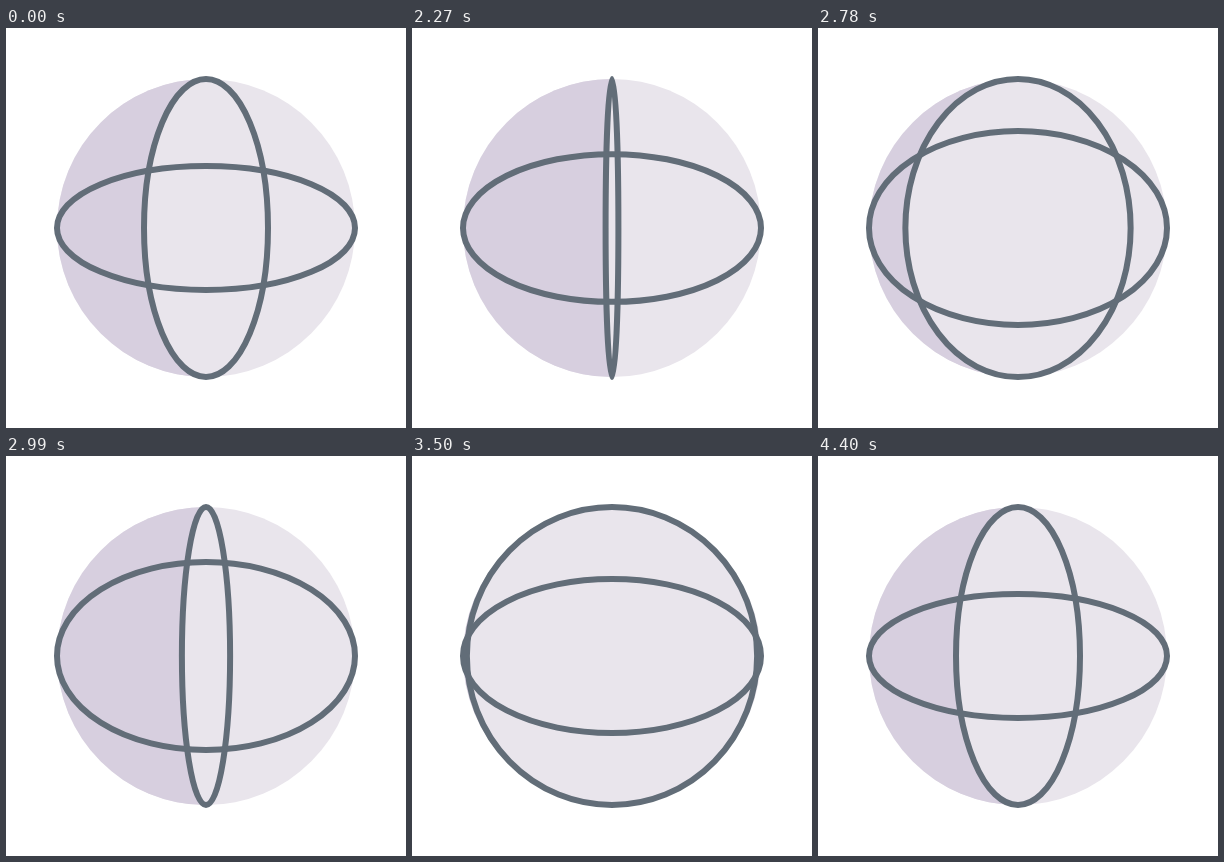
Recreate the animation shown at these times as an HTML page. Size 400 px wide and 400 px high, loop 4430 ms.

```html
<!DOCTYPE html>
<html lang="en">
<head>
<meta charset="utf-8">
<title>Turning globe</title>
<style>
  html, body { margin: 0; width: 100%; height: 100%; overflow: hidden; background: #fff; }
  svg { display: block; width: 100vw; height: 100vh; }
  .light { fill: #e9e5ec; }
  .dark { fill: #d7cfdf; }
  .ring { fill: none; stroke: #626d78; stroke-width: 6; }
</style>
</head>
<body>
<svg viewBox="0 0 400 400">
  <circle class="light" cx="200" cy="200" r="149"/>
  <path class="dark" d="M200 51A149 149 0 0 0 200 349Z"/>
  <ellipse class="light meridian" cx="200" cy="200" ry="149"/>
  <ellipse class="ring meridian" cx="200" cy="200" ry="149"/>
  <ellipse class="ring" id="equator" cx="200" cy="200" rx="149"/>
</svg>
<script>
  const LOOP = 4430, HOLD = 2000, TURN = 2400, STEP = 30, R = 149;
  const START = Math.asin(62 / R);

  // Keys: [progress, value, slope]
  const spin = [
    [0, 0, 20], [.2125, 79.2, 590], [.4125, 213.9, 590],
    [.625, 307.7, 290], [.7875, 339, 140], [1, 360, 20]
  ];
  const tilt = [
    [0, 62, 0], [.2125, 90, 120], [.333, 97, 0], [.4125, 94, -70],
    [.625, 77, -85], [.7875, 65, -35], [1, 62, 0]
  ];

  const meridians = document.querySelectorAll('.meridian');
  const equator = document.getElementById('equator');

  // Cubic Hermite interpolation between keys
  function sample(keys, t) {
    let i = 1;
    while (i < keys.length - 1 && t > keys[i][0]) i++;
    const [t0, a, m0] = keys[i - 1], [t1, b, m1] = keys[i];
    const d = t1 - t0, u = (t - t0) / d, v = 1 - u;
    return a * v * v * (1 + 2 * u) + b * u * u * (3 - 2 * u)
      + d * u * v * (m0 * v - m1 * u);
  }

  function draw(ms) {
    const time = Math.floor((ms % LOOP - HOLD) / STEP) * STEP;
    const t = Math.min(1, Math.max(0, time / TURN));
    const angle = START - sample(spin, t) * Math.PI / 180;
    const rx = R * Math.abs(Math.sin(angle));
    meridians.forEach(m => m.setAttribute('rx', Math.max(rx, .01)));
    equator.setAttribute('ry', sample(tilt, t));
  }

  const begin = performance.now();
  function tick() {
    draw(performance.now() - begin);
    requestAnimationFrame(tick);
  }
  tick();
</script>
</body>
</html>
```
